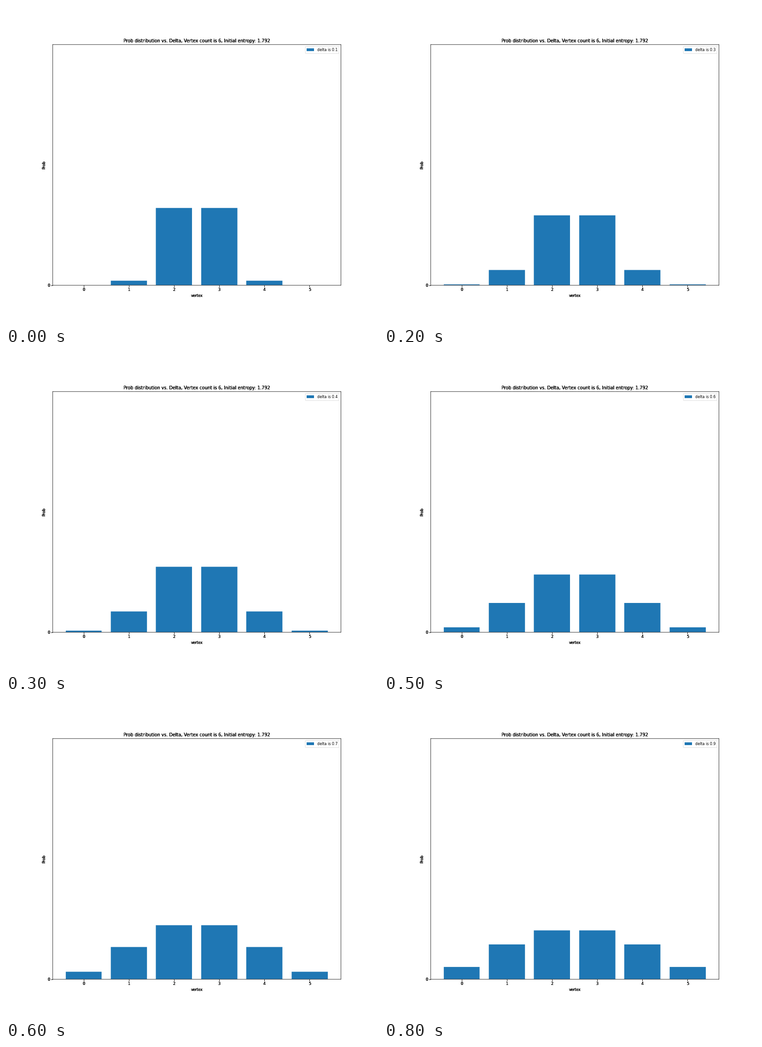
Animation, 808 px wide and 693 px high, one loop 0.9 s. Source, as a matplotlib script:

```python
import matplotlib.pyplot as plt
from matplotlib.animation import FuncAnimation

W, H, DPI = 808, 693, 100
GRID_W, GRID_H = 1008, 864  # layout grid, shrunk to the stage
K = W / GRID_W * 72 / DPI  # points per grid unit
LEFT, RIGHT, TOP, BOTTOM = 126.5, 907.5, 104.5, 756.5
FRAMES, STEP_MS = 9, 100
TEXT_LAYERS = 3  # stacked axes thicken the labels

plt.rcParams.update({
    "font.family": "DejaVu Sans",
    "font.size": 10 * K,
    "axes.titlesize": 12 * K,
    "axes.titlepad": 6 * K,
    "axes.labelpad": 4 * K,
    "axes.linewidth": K,
    "patch.linewidth": K,
    "xtick.major.size": 3.5 * K,
    "ytick.major.size": 3.5 * K,
    "xtick.major.pad": 3.5 * K,
    "ytick.major.pad": 3.5 * K,
    "xtick.major.width": K,
    "ytick.major.width": K,
})

# Probabilities of the outer and inner vertices for delta 0.1 to 0.9
OUTER = [0.0002, 0.0018, 0.0046, 0.009, 0.0165, 0.0265, 0.0395, 0.052, 0.0642]
INNER = [0.028, 0.0595, 0.0885, 0.118, 0.1415, 0.159, 0.1715, 0.1785, 0.1816]

TITLE = "Prob distribution vs. Delta, Vertex count is 6, Initial entropy: 1.792"

fig = plt.figure(figsize=(W / DPI, H / DPI), dpi=DPI, facecolor="white")


def grid_x(x):
    return 126 + 781.2 * (x + 0.69) / 6.38


def add_axes(layer):
    box = [LEFT / GRID_W, 1 - BOTTOM / GRID_H,
           (RIGHT - LEFT) / GRID_W, (BOTTOM - TOP) / GRID_H]
    ax = fig.add_axes(box, label=f"layer{layer}", zorder=layer)
    ax.set_facecolor("white" if layer == 0 else "none")
    ax.set_xticks([grid_x(v) for v in range(6)], [str(v) for v in range(6)])
    ax.set_yticks([BOTTOM], ["0"])
    ax.set(xlim=(LEFT, RIGHT), ylim=(BOTTOM, TOP),
           title=TITLE, xlabel="vertex", ylabel="Prob")
    for spine in ax.spines.values():
        spine.set_snap(False)
        spine.set_visible(layer == 0)
    return ax


axes = [add_axes(i) for i in range(TEXT_LAYERS)]
starts = [round(grid_x(v - 0.4)) for v in range(6)]
ends = [round(grid_x(v + 0.4)) for v in range(6)]
bars = axes[0].bar(starts, [0] * 6, [b - a for a, b in zip(starts, ends)],
                   bottom=756, align="edge", color="#1f77b4", snap=False,
                   label="delta is 0.1")
axes[0].set(xlim=(LEFT, RIGHT), ylim=(BOTTOM, TOP))
legend = axes[0].legend(loc="upper right")
legend.get_frame().set_snap(False)


def update(i):
    middle = 0.5 - OUTER[i] - INNER[i]
    half = [OUTER[i], INNER[i], middle]
    # The vertical axis reaches one above the largest probability
    unit = 652.32 / (1 + middle)
    for bar, p in zip(bars, half + half[::-1]):
        bar.set_height(-round(p * unit))
    label = legend.get_texts()[0]
    label.set_text(f"delta is {(i + 1) / 10:.1f}")
    return [*bars, label]


anim = FuncAnimation(fig, update, frames=FRAMES, interval=STEP_MS,
                     init_func=lambda: update(0), repeat=True,
                     repeat_delay=0, blit=False)
plt.show()
```
